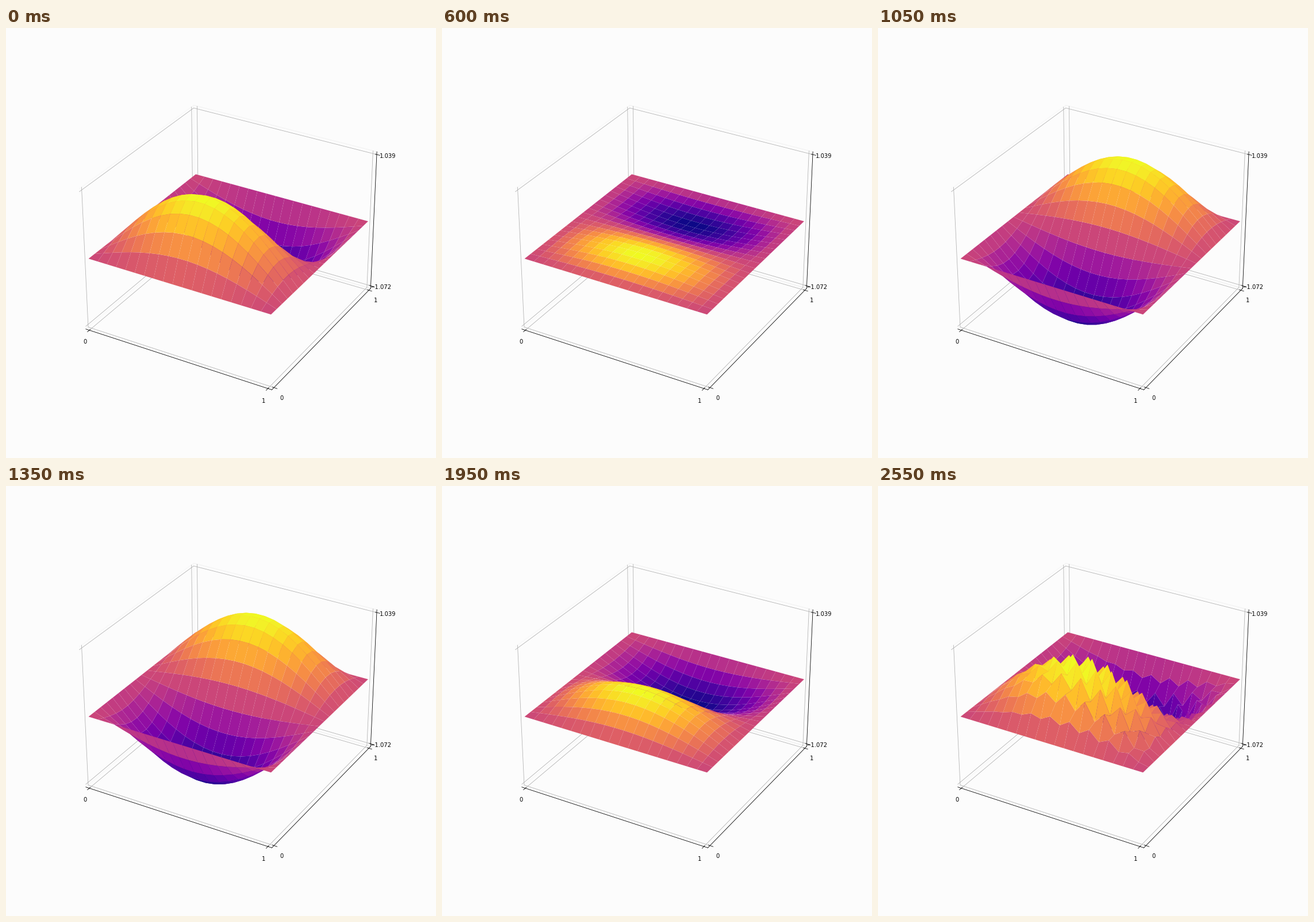
Animation of 748x748 px, one loop 2.7 s. Source, as a matplotlib script:

```python
import numpy as np
import matplotlib.pyplot as plt
from matplotlib.animation import FuncAnimation

SIZE, DPI = 748, 72
CELLS, STEPS = 19, 17
Z_MIN, Z_MAX = -1.072, 1.039
BACKGROUND = "#fcfcfc"

# Standing wave on a square membrane, stepped explicitly with dt = 1 / STEPS.
i = np.arange(CELLS + 1)
arc = np.pi * i / CELLS
X, Y = np.meshgrid(i / CELLS, i / CELLS)
mode = np.sin(np.pi * X) * np.sin(2 * np.pi * Y)

courant = (CELLS / STEPS) ** 2


def laplace(m, n):
    """Eigenvalue of the five-point stencil for the mode (m, n)."""
    return 4 * sum(np.sin(q * np.pi / (2 * CELLS)) ** 2 for q in (m, n))


theta = np.arccos(1 - courant * laplace(1, 2) / 2)

# The step is too long, so a checkerboard ripple grows in the last steps.
half = courant * laplace(CELLS - 1, CELLS - 1) / 2 - 1
growth = -(half + np.sqrt(half ** 2 - 1))
across = (-1.0) ** i * (np.sin(arc) - 0.5 * np.sin(2 * arc))
along = (-1.0) ** i * (np.sin(arc) + 0.45 * np.sin(3 * arc))
ripple = 0.12 * np.outer(along, across)


def height(step):
    swing = np.cos(theta * (step - 0.5)) / np.cos(theta / 2)
    return swing * mode + growth ** (step - STEPS) * ripple


def padded(lo, hi):
    pad = (hi - lo) / 48
    return lo - pad, hi + pad


fig = plt.figure(figsize=(SIZE / DPI, SIZE / DPI), dpi=DPI, facecolor=BACKGROUND)
ax = fig.add_subplot(projection="3d", facecolor=BACKGROUND)
ax.set_xlim(*padded(0, 1))
ax.set_ylim(*padded(0, 1))
ax.set_zlim(*padded(Z_MIN, Z_MAX))
ax.set_xticks([0, 1])
ax.set_yticks([0, 1])
ax.set_zticks([Z_MIN, Z_MAX])
for axis in (ax.xaxis, ax.yaxis, ax.zaxis):
    axis.pane.set_fill(False)

surface = None


def update(step):
    global surface
    if surface is not None:
        surface.remove()
    surface = ax.plot_surface(X, Y, height(step), cmap="plasma", linewidth=0)
    return [surface]


anim = FuncAnimation(fig, update, frames=STEPS + 1, interval=150,
                     init_func=lambda: update(0), repeat=True, repeat_delay=0)
plt.show()
```
